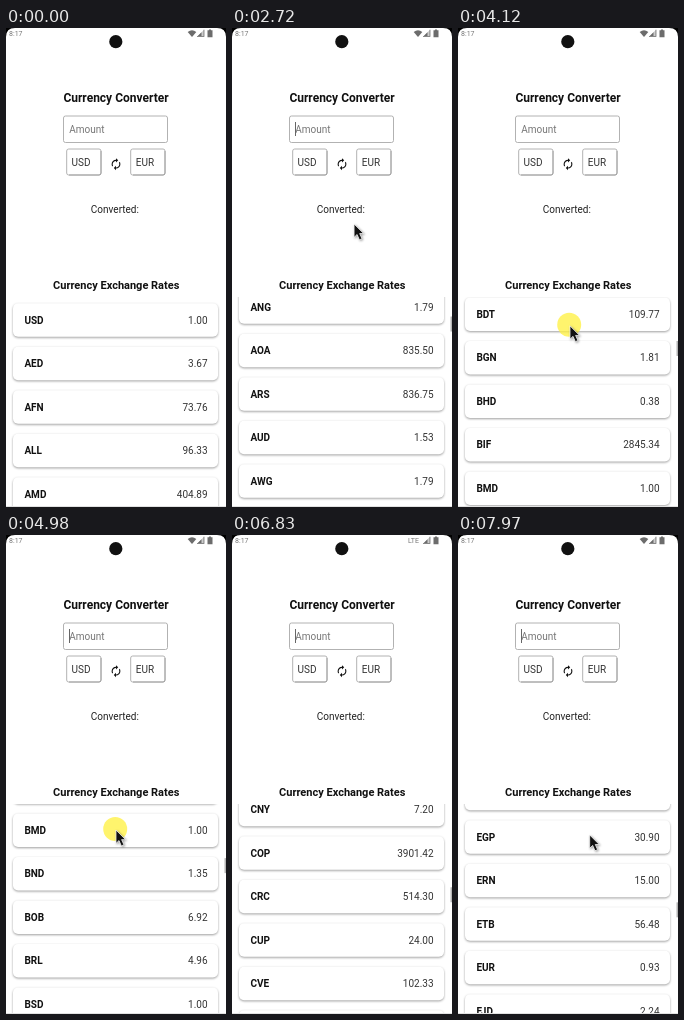
An HTML page for the animation above (8000 ms loop, 220 by 479 pixels).

```html
<!DOCTYPE html>
<html lang="en">
<head>
<meta charset="utf-8">
<title>Currency Converter</title>
<style>
  html, body { margin: 0; width: 100%; height: 100%; overflow: hidden; background: #000; }
  svg { display: block; width: 100%; height: 100%; }
  text { font: 10px Roboto, sans-serif; fill: #333; }
  .title { font-weight: 700; fill: #111; text-anchor: middle; }
  .code { font-weight: 700; fill: #111; }
  .rate { text-anchor: end; }
  .status { font-size: 7px; fill: #777; }
  .card { fill: #fff; filter: drop-shadow(0 1px 1.1px rgba(0, 0, 0, .38)); }
  .field { fill: #fff; stroke: #aaa; stroke-width: .9; }
  .edge { fill: none; stroke: #999; stroke-width: .8; }
  .icon { fill: #6c6c6c; }
</style>
</head>
<body>
<svg viewBox="0 0 220 479">
  <defs>
    <clipPath id="viewport"><rect y="269" width="220" height="210"/></clipPath>
  </defs>
  <path d="M0 479V9Q0 0 9 0H211Q220 0 220 9V479Z" fill="#fff"/>

  <text class="status" x="3" y="8">8:17</text>
  <circle cx="109.8" cy="13.7" r="6.6" fill="#111"/>
  <path id="wifi" class="icon" d="M181.7 4Q186 .6 190.3 4L186 9Z"/>
  <text id="lte" class="status" x="176" y="8.3">LTE</text>
  <path d="M198.3 1.5V8.8H191Z" fill="#ccc"/>
  <path class="icon" d="M195.5 4.3V8.8H191ZM197.6 1.8H198.3V8.8H191V8.1H197.6Z"/>
  <path class="icon" d="M201.5 2.2H203V1.4H205V2.2H206.5V9.2H201.5Z"/>

  <text class="title" x="110" y="74" style="font-size:12px">Currency Converter</text>
  <rect class="field" x="57.5" y="88" width="104" height="26.5" rx="2"/>
  <text x="63.2" y="105.2" style="fill:#777">Amount</text>
  <rect id="caret" x="63" y="94" width="1" height="14" fill="#666"/>
  <rect class="field" x="60.7" y="121" width="34.3" height="26" rx="2"/>
  <path class="edge" d="M95 123V145Q95 147 93 147H63"/>
  <text x="65.6" y="137.8">USD</text>
  <rect class="field" x="124.7" y="121" width="34.3" height="26" rx="2"/>
  <path class="edge" d="M159 123V145Q159 147 157 147H127"/>
  <text x="129.8" y="137.8">EUR</text>
  <path transform="translate(103.4 129.6) scale(.55)" fill="#111"
    d="M12 6v3l4-4-4-4v3c-4.42 0-8 3.58-8 8 0 1.57.46 3.03 1.24 4.26L6.7 14.8A5.87 5.87 0 0 1 6 12c0-3.31 2.69-6 6-6zm6.76 1.74L17.3 9.2c.44.84.7 1.79.7 2.8 0 3.31-2.69 6-6 6v-3l-4 4 4 4v-3c4.42 0 8-3.58 8-8 0-1.57-.46-3.03-1.24-4.26z"/>
  <text x="108.9" y="184.8" text-anchor="middle" style="fill:#222">Converted:</text>
  <text class="title" x="110.2" y="261.2" style="font-size:11px">Currency Exchange Rates</text>

  <g clip-path="url(#viewport)"><g id="list"></g></g>
  <rect id="thumb" x="218.5" width="1.5" height="15" fill="#b4b4b4"/>
  <rect y="478" width="220" height="1" fill="#e2e2e2"/>

  <g id="pointer">
    <circle id="press" cx="-.8" cy="-1" r="12" fill="#fff03c" opacity=".75"/>
    <path transform="scale(.92)" d="M0 0V14.5L3.3 11.4L5.8 17.2L8.6 16L6.1 10.4H10.4Z" fill="#111"
      stroke="#fff" stroke-width=".8" style="filter:drop-shadow(1px 1px 1px rgba(0,0,0,.4))"/>
  </g>
</svg>
<script>
const LOOP = 8000, TICK = 66.42, PITCH = 43.5, FRICTION = 250;
const rates = `USD 1.00,AED 3.67,AFN 73.76,ALL 96.33,AMD 404.89,ANG 1.79,AOA 835.50,ARS 836.75,
AUD 1.53,AWG 1.79,AZN 1.70,BAM 1.81,BBD 2.00,BDT 109.77,BGN 1.81,BHD 0.38,BIF 2845.34,BMD 1.00,
BND 1.35,BOB 6.92,BRL 4.96,BSD 1.00,BTN 83.05,BWP 13.72,BYN 3.26,BZD 2.00,CAD 1.35,CDF 2733.29,
CHF 0.88,CLP 967.42,CNY 7.20,COP 3901.42,CRC 514.30,CUP 24.00,CVE 102.33,CZK 23.50,DJF 177.72,
DKK 6.91,DOP 58.64,DZD 134.52,EGP 30.90,ERN 15.00,ETB 56.48,EUR 0.93,FJD 2.24`;

// Each swipe drags the list with the pointer, then lets it coast
const swipe = (start, end, x, from, to, coast) => ({ start, end, x, from, to, coast });
const swipes = [
  swipe(1930, 2460, 123, 378, 169, 33),
  swipe(3200, 3500, 116, 372, 205, 93),
  swipe(3930, 4320, 112, 375, 215, 20),
  swipe(4800, 5290, 110, 351, 200, 70),
  swipe(6240, 6500, 128, 365, 145, 268),
  swipe(7250, 7550, 134, 372, 200, 206),
  swipe(8268, 8500, 130, 372, 200, 0),
];

const $ = id => document.getElementById(id);
const show = (id, on) => $(id).setAttribute("visibility", on ? "visible" : "hidden");
const within = (t, start, end) => t >= start && t < end;
const progress = (t, start, end) => Math.min(1, Math.max(0, (t - start) / (end - start)));

// Stops of the pointer: a look around first, then back down before every swipe
const stop = (t, x, y) => ({ t, x, y });
const stops = [stop(460, 178, 370), stop(660, 119, 136), stop(1460, 118, 136), stop(1860, 123, 378)];
for (const s of swipes) {
  const last = stops[stops.length - 1];
  stops.push(
    stop(Math.max(last.t, s.start - 530), last.x, last.y),
    stop(Math.max(last.t, s.start - 130), s.x, s.from),
    stop(s.start, s.x, s.from),
    stop(s.end, s.x, s.to));
}

function pointerAt(t) {
  const i = Math.max(1, stops.findIndex(s => s.t > t));
  const a = stops[i - 1], b = stops[i], p = progress(t, a.t, b.t);
  return [a.x + (b.x - a.x) * p, a.y + (b.y - a.y) * p];
}

function scrollAt(t) {
  return swipes.reduce((sum, s) => sum
    + (s.from - s.to) * progress(t, s.start, s.end)
    + s.coast * (1 - Math.exp(-Math.max(0, t - s.end) / FRICTION)), 0);
}

$("list").innerHTML = rates.split(",").map((row, i) => {
  const [code, rate] = row.trim().split(" ");
  return `<g transform="translate(0 ${275.2 + i * PITCH})">
    <rect class="card" x="7" width="205" height="33.5" rx="5"/>
    <text class="code" x="18.4" y="20.4">${code}</text>
    <text class="rate" x="201.6" y="20.4">${rate}</text></g>`;
}).join("");

function draw(now) {
  const step = Math.floor(now % LOOP / TICK + .2), t = step * TICK;
  const scroll = scrollAt(t);
  $("list").setAttribute("transform", `translate(0 ${-scroll})`);
  // The thumb slows down as more rows are loaded
  $("thumb").setAttribute("y", 269 + 154 * (1 - Math.exp(-scroll / 1700)));
  show("thumb", scroll > 0);
  show("caret", step >= 7 && (step - 7) % 15 < 9);

  const hidden = t < 460 || within(t, 6640, 7040);
  $("pointer").setAttribute("transform", `translate(${pointerAt(t)})`);
  show("pointer", !hidden);
  show("press", !hidden && swipes.some(s => within(t, s.start, s.end)));

  const lte = within(t, 6500, 7500);
  show("lte", lte);
  show("wifi", !lte);
}

const start = performance.now();
function loop() {
  draw(performance.now() - start);
  requestAnimationFrame(loop);
}
loop();
</script>
</body>
</html>
```
